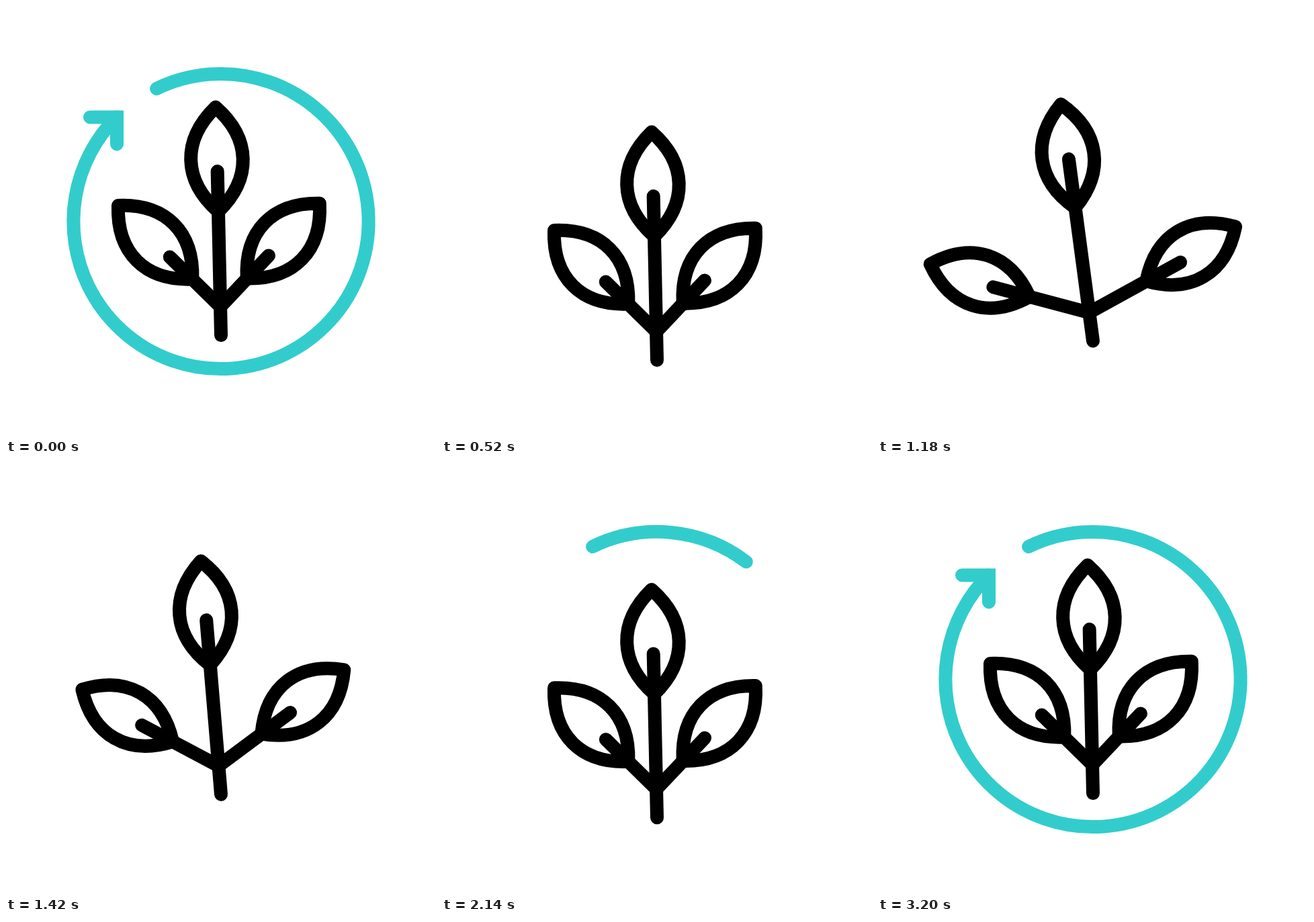
Recreate the animation shown at these times as an HTML page with a canvas. Size 640 by 640 pixels, loop 3600 ms.

```html
<!DOCTYPE html>
<html lang="en">
<head>
<meta charset="utf-8">
<title>Sprout cycle</title>
<style>
  html, body { margin: 0; width: 100%; height: 100%; overflow: hidden; background: #fff; }
  canvas { display: block; width: 100vw; height: 100vh; object-fit: contain; }
</style>
</head>
<body>
<canvas id="stage" width="640" height="640"></canvas>
<script>
const ctx = document.getElementById('stage').getContext('2d');
const LOOP = 3600, STEP = 20;
const RAD = Math.PI / 180;
const TEAL = '#33cccc', BLACK = '#000';

const ramp = (t, from, to) => Math.min(1, Math.max(0, (t - from) / (to - from)));
const ease = (t, from, to) => (1 - Math.cos(Math.PI * ramp(t, from, to))) / 2;

// The plant sinks and rises twice.
const SINK = 620, RISE = 1400, SINK_AGAIN = 1880, SETTLE = 2890;
const baseY = t => 490
  + 39.5 * ease(t, 0, SINK) - 38 * ease(t, SINK, RISE)
  + 41.5 * ease(t, RISE, SINK_AGAIN) - 43 * ease(t, SINK_AGAIN, SETTLE);

// During the first rise it stretches up, spreads wide, then returns to rest.
const up = t => ease(t, 540, 900) - ease(t, 900, 1180);
const wide = t => ease(t, 900, 1180) - ease(t, 1180, 1700);
const blend = ([rest, tall, open], t) =>
  rest + (tall - rest) * up(t) + (open - rest) * wide(t);

// Values at rest, stretched and spread: stalk direction, joint to leaf foot,
// leaf direction; then how far the stalk enters the leaf and slides when spread.
const stem = { angle: [-1.25, 1.6, -7.6], reach: [184, 244, 200], leaf: [-1.5, 1.3, -7.9], inset: 60, slide: 13 };
const left = { angle: [-45.5, -35.5, -75.1], reach: [58.5, 113.5, 92], leaf: [-45.2, -33.6, -71.8], inset: 47, slide: 9 };
const right = { angle: [43.4, 39.3, 61.1], reach: [57.7, 131, 97], leaf: [44, 39.5, 58.6], inset: 47, slide: 11 };

const RING = { x: 320, y: 320.5, r: 219.6, start: -115.9 * RAD, sweep: 340.8 * RAD };
const ringPart = t => 1 - ease(t, 40, 500) + ramp(t, 1940, 3020);
const headPart = t => 1 - ramp(t, 0, 100) + ramp(t, 3020, 3200);

const move = (p, deg, d) => ({
  x: p.x + Math.sin(deg * RAD) * d,
  y: p.y - Math.cos(deg * RAD) * d
});

function line(...pts) {
  ctx.beginPath();
  pts.forEach(p => ctx.lineTo(p.x, p.y));
  ctx.stroke();
}

function drawLeaf(foot, deg) {
  const len = 155.5, bulge = 51.7, k = 48;
  ctx.save();
  ctx.translate(foot.x, foot.y);
  ctx.rotate(deg * RAD);
  ctx.beginPath();
  ctx.moveTo(0, 0);
  ctx.bezierCurveTo(-bulge, -k, -bulge, k - len, 0, -len);
  ctx.bezierCurveTo(bulge, k - len, bulge, -k, 0, 0);
  ctx.closePath();
  ctx.stroke();
  ctx.restore();
}

function drawPart(part, joint, t) {
  const angle = blend(part.angle, t), reach = blend(part.reach, t);
  line(joint, move(joint, angle, reach + part.inset + part.slide * wide(t)));
  drawLeaf(move(joint, angle, reach), blend(part.leaf, t));
}

function drawRing(t) {
  const f = ringPart(t), h = headPart(t);
  ctx.strokeStyle = TEAL;
  if (f > 0.001) {
    ctx.beginPath();
    ctx.arc(RING.x, RING.y, RING.r, RING.start, RING.start + RING.sweep * f);
    ctx.stroke();
  }
  if (h > 0.01) {
    const x = 165, y = 165.5, arm = 40 * h;
    ctx.lineJoin = 'miter';
    line({ x: x - arm, y }, { x, y }, { x, y: y + arm });
  }
}

function drawSprout(t) {
  const base = { x: 320, y: baseY(t) };
  const fork = move(base, blend(stem.angle, t), 42.5);
  ctx.strokeStyle = BLACK;
  ctx.lineJoin = 'round';
  drawPart(stem, base, t);
  drawPart(left, fork, t);
  drawPart(right, fork, t);
}

function draw(t) {
  ctx.fillStyle = '#fff';
  ctx.fillRect(0, 0, 640, 640);
  ctx.lineWidth = 20;
  ctx.lineCap = 'round';
  drawRing(t);
  drawSprout(t);
}

let begin = null;
function tick(now) {
  if (begin === null) begin = now;
  const t = (now - begin) % LOOP;
  draw(Math.floor(t / STEP) * STEP);
  requestAnimationFrame(tick);
}
draw(0);
requestAnimationFrame(tick);
</script>
</body>
</html>
```
